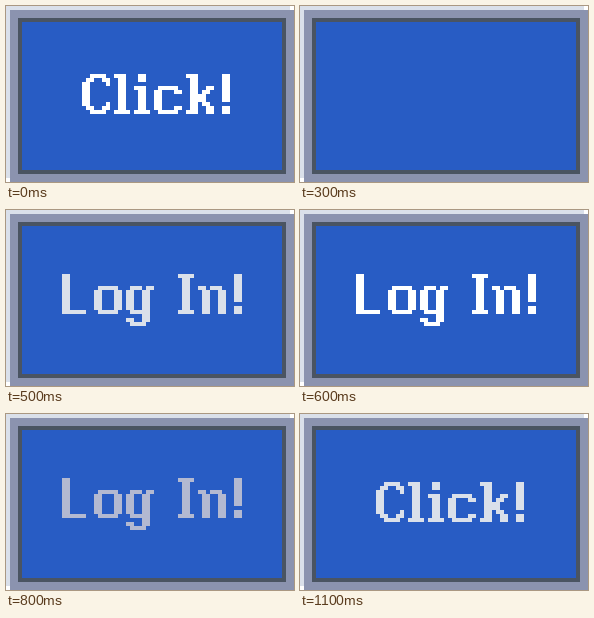
Write an HTML page with a canvas that moves like this. It is 288 by 176 pixels and loops after 1200 ms.

```html
<!DOCTYPE html>
<html lang="en">
<head>
<meta charset="utf-8">
<title>Button</title>
<style>
  html, body { margin: 0; width: 100%; height: 100%; overflow: hidden; background: #fff; }
  canvas { display: block; width: 288px; height: 176px; }
</style>
</head>
<body>
<canvas id="stage" width="288" height="176" role="img" aria-label="Click! Log In!"></canvas>
<script>
const ctx = document.getElementById('stage').getContext('2d');
const CELL = 4, STEP = 100, STEPS = 12;
const WHITE = '#ffffff', LIGHT = '#dae0ea', DIM = '#b3b9d1';
const FRAME = '#8b93af', EDGE = '#4a5462', BLUE = '#285cc4';

// Drawing helpers work in cells; glyph parts are relative to the pen.
let penX = 0, penY = 0;
const rect = (x, y, w, h) =>
  ctx.fillRect((penX + x) * CELL, (penY + y) * CELL, w * CELL, h * CELL);
const bar = (x, y, w) => rect(x, y, w, 1);
const stem = (x, y, h = 1) => rect(x, y, 2, h);

// Each glyph draws itself and returns its advance.
const glyphs = {
  'C'() {
    bar(2, 0, 4); stem(1, 1); stem(5, 1);
    stem(0, 2, 6); bar(6, 2, 1); bar(6, 7, 1);
    stem(1, 8); stem(5, 8); bar(2, 9, 4);
    return 8;
  },
  'l'() { bar(0, 0, 3); stem(1, 1, 8); bar(0, 9, 4); return 5; },
  'i'() { stem(1, 0, 2); bar(0, 3, 3); stem(1, 4, 5); bar(0, 9, 4); return 5; },
  'c'() {
    bar(1, 3, 5); stem(0, 4, 5); stem(5, 4); stem(5, 8); bar(1, 9, 5);
    return 8;
  },
  'k'() {
    bar(0, 0, 3); stem(1, 1, 8); bar(0, 9, 3);
    stem(5, 3); stem(4, 4); stem(3, 5, 2); stem(4, 7); stem(5, 8, 2);
    return 9;
  },
  'L'() { stem(0, 0, 9); bar(0, 9, 6); return 8; },
  'o'() { bar(1, 3, 5); stem(0, 4, 5); stem(5, 4, 5); bar(1, 9, 5); return 8; },
  'g'() {
    bar(1, 3, 3); bar(5, 3, 2); stem(0, 4, 5); stem(4, 4, 8);
    bar(1, 9, 3); stem(0, 11); bar(1, 12, 4);
    return 8;
  },
  'I'() { bar(0, 0, 4); stem(1, 1, 8); bar(0, 9, 4); return 5; },
  'n'() { stem(0, 3); bar(3, 3, 3); stem(1, 4, 6); stem(5, 4, 6); return 9; },
  '!'() { stem(0, 0, 7); stem(0, 8, 2); return 3; },
  ' '() { return 5; }
};

function write(text, x, y, color) {
  ctx.fillStyle = color;
  penX = x;
  penY = y;
  for (const ch of text) penX += glyphs[ch]();
  penX = penY = 0;
}

function box(x, y, w, h, color) {
  ctx.fillStyle = color;
  rect(x, y, w, h);
}

function panel() {
  box(0, 0, 72, 44, WHITE);
  box(0, 0, 71, 43, LIGHT);
  box(1, 1, 71, 43, FRAME);
  box(3, 3, 67, 39, EDGE);
  box(4, 4, 65, 37, BLUE);
}

function draw(now) {
  const step = Math.floor(now / STEP) % STEPS;
  const phase = Math.min(step, STEPS - step); // 0 = Click!, 3 = blank, 6 = Log In!
  const color = [DIM, LIGHT, WHITE][Math.abs(phase - 3) - 1];
  panel();
  if (phase < 3) write('Click!', 19, 17, color);
  if (phase > 3) write('Log In!', 14, 16, color);
}

const start = performance.now();
function tick() {
  draw(performance.now() - start);
  requestAnimationFrame(tick);
}
tick();
</script>
</body>
</html>
```
